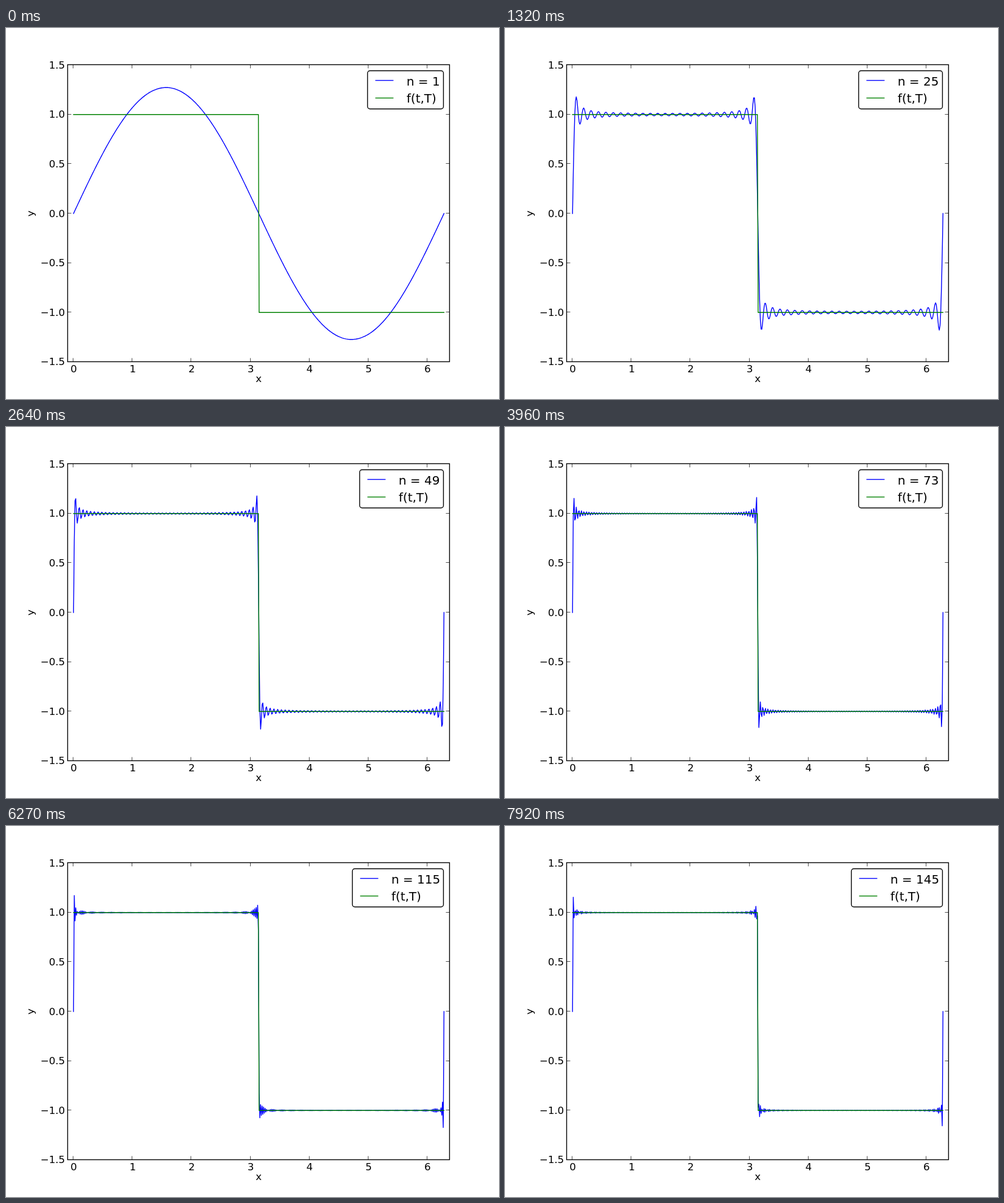
An HTML page with a canvas for the animation above (8000 ms loop, 812 by 612 pixels).

```html
<!DOCTYPE html>
<html lang="en">
<head>
<meta charset="utf-8">
<title>Square wave Fourier series</title>
<style>
  html, body { margin: 0; width: 100%; height: 100%; overflow: hidden; background: #fff; }
  canvas { display: block; }
</style>
</head>
<body>
<canvas id="plot" width="812" height="612"></canvas>
<script>
const ctx = document.getElementById('plot').getContext('2d');

const LOOP = 8000, STEP = 330;
const SAMPLES = 500;
const BLUE = '#0000ff', GREEN = '#008000', BLACK = '#000000';
const LINE = 100 / 72, THIN = LINE / 2;
const LABEL_FONT = '16.667px "DejaVu Sans", sans-serif';
const LEGEND_FONT = '20px "DejaVu Sans", sans-serif';

const box = { left: 101.5, right: 730.8, top: 61.2, bottom: 550.8 };
const xMin = -0.1, xMax = 6.38, yMax = 1.5;
const px = x => box.left + (x - xMin) / (xMax - xMin) * (box.right - box.left);
const py = y => box.top + (yMax - y) / (2 * yMax) * (box.bottom - box.top);
const snap = v => Math.floor(v - 0.5) + 0.5;

const edge = {
  left: snap(box.left), right: snap(box.right),
  top: snap(box.top), bottom: snap(box.bottom)
};

const xs = Array.from({ length: SAMPLES }, (_, i) => 2 * Math.PI * i / (SAMPLES - 1));
const square = x => x < Math.PI ? 1 : -1;

// Sum of the first n odd harmonics of the square wave.
function series(x, n) {
  let sum = 0;
  for (let m = 1; m < 2 * n; m += 2) sum += Math.sin(m * x) / m;
  return 4 / Math.PI * sum;
}

function stroke(points, color, width, cap) {
  ctx.beginPath();
  for (const [x, y] of points) ctx.lineTo(x, y);
  ctx.strokeStyle = color;
  ctx.lineWidth = width;
  ctx.lineCap = cap;
  ctx.lineJoin = 'round';
  ctx.stroke();
}

function curve(fn, color) {
  stroke(xs.map(x => [px(x), py(fn(x))]), color, LINE, 'square');
}

function text(str, x, y, align, font = LABEL_FONT) {
  ctx.font = font;
  ctx.textAlign = align;
  ctx.fillStyle = BLACK;
  ctx.fillText(str, x, y);
}

function tick(x, y, dx, dy) {
  stroke([[x, y], [x + dx, y + dy]], BLACK, THIN, 'butt');
}

function drawAxes() {
  const len = 6;
  for (let i = 0; i <= 6; i++) {
    const x = snap(px(i));
    tick(x, edge.bottom, 0, -len);
    tick(x, edge.top, 0, len);
    text(String(i), px(i) + 0.4, 568, 'center');
  }
  for (let i = -3; i <= 3; i++) {
    const value = i / 2, y = snap(py(value));
    tick(edge.left, y, len, 0);
    tick(edge.right, y, -len, 0);
    text(value.toFixed(1).replace('-', '\u2212'), 97.2, Math.floor(py(value) + 6), 'right');
  }
  ctx.strokeStyle = BLACK;
  ctx.lineWidth = LINE;
  ctx.lineJoin = 'miter';
  ctx.strokeRect(edge.left, edge.top, edge.right - edge.left, edge.bottom - edge.top);

  text('x', 416.2, 584, 'center');
  ctx.save();
  ctx.translate(46, 306);
  ctx.rotate(-Math.PI / 2);
  text('y', 0, 0, 'center');
  ctx.restore();
}

function legendLeft(n) {
  const digits = String(n).length;
  const wide = digits === 3 && (n % 10 === 3 || n % 10 === 9);
  return [595.5, 582.5, 570.5][digits - 1] - (wide ? 1 : 0);
}

function drawLegend(n) {
  const left = legendLeft(n), top = 70.5;
  ctx.beginPath();
  ctx.roundRect(left, top, 720.5 - left, 63, 4);
  ctx.fillStyle = '#fff';
  ctx.fill();
  ctx.strokeStyle = BLACK;
  ctx.lineWidth = LINE;
  ctx.stroke();

  const row = (label, color, y, base) => {
    stroke([[left + 13.5, y], [left + 42, y]], color, LINE, 'square');
    text(label, left + 64.3, base, 'left', LEGEND_FONT);
  };
  row('n = ' + n, BLUE, 86.5, 95);
  row('f(t,T)', GREEN, 115.5, 123);
}

function draw(n) {
  ctx.fillStyle = '#fff';
  ctx.fillRect(0, 0, 812, 612);
  curve(x => series(x, n), BLUE);
  curve(square, GREEN);
  drawAxes();
  drawLegend(n);
}

let shown = 0;
function frame() {
  const n = 1 + 6 * Math.floor(performance.now() % LOOP / STEP);
  if (n !== shown) draw(shown = n);
  requestAnimationFrame(frame);
}
frame();
</script>
</body>
</html>
```
